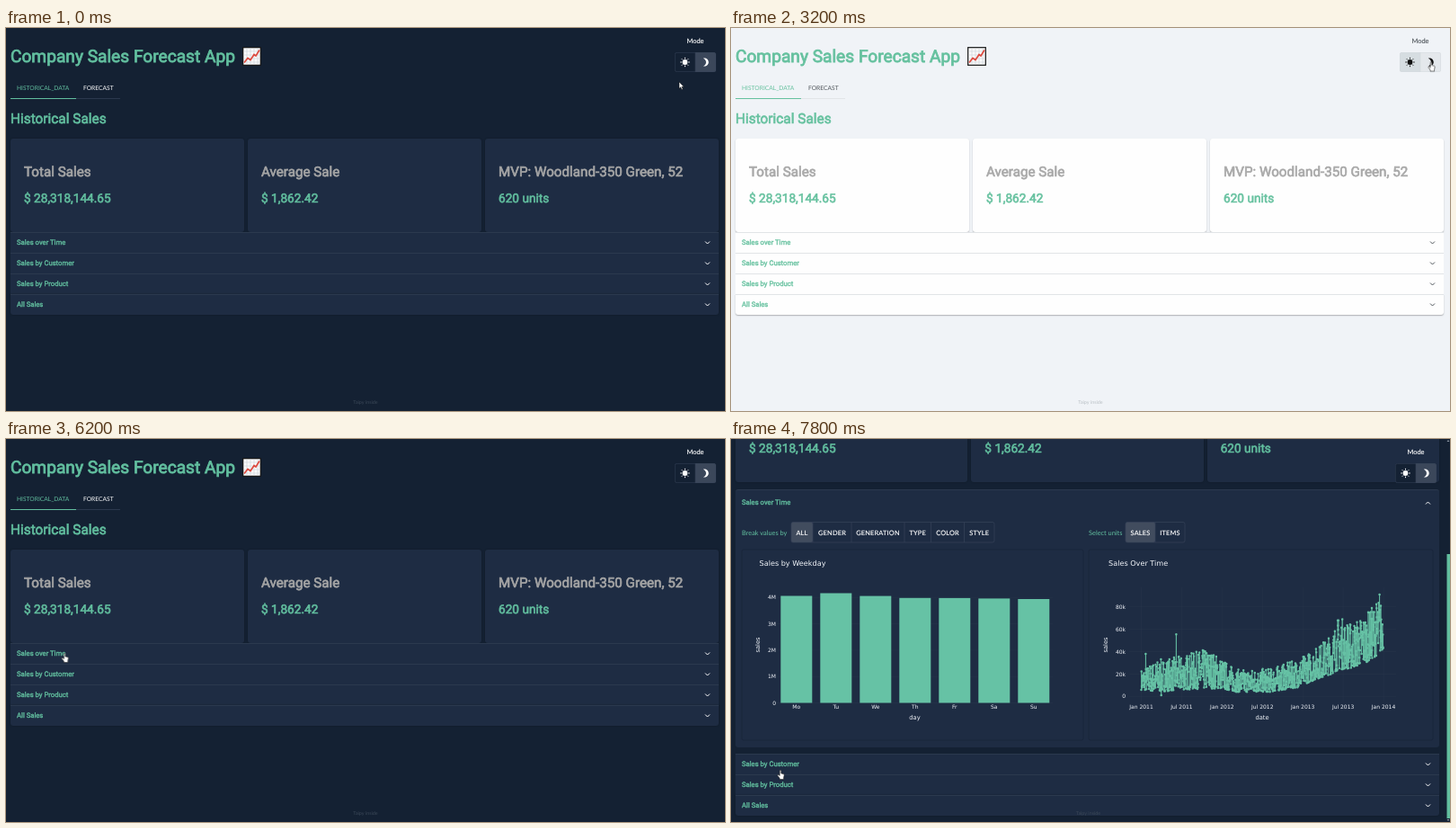
An HTML page for the animation above (8 s loop, 800 by 426 pixels).

```html
<!DOCTYPE html>
<html lang="en">
<head>
<meta charset="utf-8">
<title>Company Sales Forecast App</title>
<style>
html, body { margin: 0; width: 100%; height: 100%; overflow: hidden; }
#app, #app * { box-sizing: border-box; animation-duration: 8s; animation-timing-function: step-end; animation-iteration-count: infinite; }
#app { position: relative; width: 800px; height: 426px; overflow: hidden; background: var(--bg); animation-name: theme, mode; font-family: Lato, sans-serif; text-rendering: geometricPrecision; }
#view { position: absolute; left: 0; top: 0; width: 800px; height: 426px; animation-name: narrow; }
#page { position: absolute; left: 5px; right: 7px; top: 0; height: 606px; animation-name: scroll; }
.t { position: absolute; line-height: 20px; white-space: nowrap; }
/* regular weight thickened by a stroke */
.h { font-family: Roboto, sans-serif; font-weight: 400; color: var(--green); -webkit-text-stroke: .045em; }
#emoji { position: absolute; left: 257.5px; top: 21px; }
.tabs { position: absolute; left: 0; top: 56px; width: 122px; height: 23px; border-bottom: 1px solid var(--line); font-size: 6.7px; color: var(--text); }
.tabs i { position: absolute; left: 0; top: 21.6px; width: 73px; height: 1.2px; background: var(--green); }
.cards { position: absolute; top: 123px; left: 0; right: 0; height: 104px; display: flex; gap: 4px; }
.card { position: relative; flex: 1; border-radius: 3px; background: var(--paper); box-shadow: var(--shadow); }
.card .t { left: 15px; }
.card .k { top: 27px; font-size: 15.2px; color: var(--grey); }
.card .v { top: 57.4px; font-size: 13.65px; }
.list { position: absolute; top: 227px; left: 0; right: 0; display: flow-root; }
.row { position: relative; height: 23px; overflow: hidden; background: var(--paper); border-top: 1px solid var(--line); }
.row:last-child { border-radius: 0 0 3px 3px; box-shadow: var(--shadow); overflow: visible; }
.row .t { left: 7px; top: 1px; font-size: 7.7px; }
.row .chev { position: absolute; right: 9.5px; top: 8px; }
.chev path { fill: none; stroke: var(--text); stroke-width: 1; }
#open { animation-name: open; }
#open .t { animation-name: head; }
#open .chev { animation-name: flip; }
#charts { position: absolute; left: -5px; top: -57px; pointer-events: none; }
.mode { position: absolute; right: 10px; top: 0; width: 46px; height: 50px; color: var(--text); }
.mode .t { left: 0; width: 46px; top: 5px; text-align: center; font-size: 7.4px; -webkit-text-stroke: .15px; }
.mode svg { position: absolute; left: 0; top: 27px; }
.foot { left: 0; right: 0; top: 407px; text-align: center; font-size: 5.4px; color: var(--faint); }
#bar { position: absolute; right: 0; top: 0; opacity: 0; animation-name: show; }
#thumb { animation-name: thumb; }
#cursor { position: absolute; left: 0; top: 0; overflow: visible; animation-name: move, shape; }
#arrow { opacity: var(--arrow); }
#hand { opacity: var(--hand); }

@keyframes theme {
  0%, 57.5%, 100% { --bg: #142133; --paper: #1e2c43; --text: #fff; --green: #62bf9f; --grey: #a6a6a6; --line: #2b394e; --faint: #3b4858; --edge: #37445a; --shadow: 0 0 2px rgba(0,0,0,.35); }
  40% { --bg: #f0f3f7; --paper: #fefefe; --text: #50565c; --green: #66c19f; --grey: #a8a8a8; --line: #e1e4e7; --faint: #b9bfc5; --edge: #d3d8dd; --shadow: 0 1px 1.5px rgba(0,0,0,.28); }
}
@keyframes mode {
  0%, 100% { --sun: transparent; --moon: #3b475a; --icon: #fff; }
  5% { --sun: #222f44; --moon: #3b475a; --icon: #fff; }
  7.5% { --sun: #626c7b; --moon: transparent; --icon: #fff; }
  15% { --sun: #4a5566; --moon: transparent; --icon: #fff; }
  32.5% { --sun: #626c7b; --moon: #364357; --icon: #fff; }
  40% { --sun: #d6dde1; --moon: #e4e8ec; --icon: #111; }
  50% { --sun: transparent; --moon: #d0d6db; --icon: #111; }
  57.5% { --sun: transparent; --moon: #4c5768; --icon: #fff; }
  60% { --sun: transparent; --moon: #3b475a; --icon: #fff; }
}
@keyframes narrow { 0%, 100% { width: 800px; } 85% { width: 795px; } }
@keyframes show { 0%, 100% { opacity: 0; } 85% { opacity: 1; } }
@keyframes open { 0%, 100% { height: 23px; margin: 0; border-radius: 0; } 85% { height: 287px; margin: 8px 0 7px; border-radius: 3px; } }
@keyframes head { 0%, 100% { top: 1px; } 85% { top: 4px; } }
@keyframes flip { 0%, 100% { transform: none; } 85% { transform: translateY(3px) rotate(180deg); } }
@keyframes scroll {
  0%, 85%, 100% { transform: none; }
  87.5% { transform: translateY(-45px); }
  90% { transform: translateY(-92px); }
  92.5% { transform: translateY(-134px); }
  95% { transform: translateY(-166px); }
  97.5% { transform: translateY(-179px); }
}
@keyframes thumb {
  0%, 85%, 100% { transform: translateY(4px); }
  87.5% { transform: translateY(35px); }
  90% { transform: translateY(68px); }
  92.5% { transform: translateY(97px); }
  95% { transform: translateY(119px); }
  97.5% { transform: translateY(128px); }
}
@keyframes shape {
  0%, 15%, 60%, 100% { --arrow: 1; --hand: 0; }
  5%, 32.5%, 77.5% { --arrow: 0; --hand: 1; }
}
@keyframes move {
  0%, 100% { transform: translate(749px, 60px); }
  2.5% { transform: translate(751px, 52px); }
  5% { transform: translate(755px, 41px); }
  7.5% { transform: translate(756px, 38px); }
  15% { transform: translate(690px, 60px); }
  17.5% { transform: translate(450px, 120px); }
  20% { transform: translate(236px, 145px); }
  22.5% { transform: translate(371px, 154px); }
  30% { transform: translate(610px, 105px); }
  32.5%, 40%, 50% { transform: translate(779px, 37.5px); }
  57.5% { transform: translate(697px, 53px); }
  60% { transform: translate(620px, 56px); }
  62.5% { transform: translate(530px, 52px); }
  65% { transform: translate(460px, 48px); }
  67.5% { transform: translate(405px, 43px); }
  70% { transform: translate(367px, 36px); }
  72.5% { transform: translate(270px, 95px); }
  75% { transform: translate(140px, 185px); }
  77.5%, 85% { transform: translate(65.3px, 238px); }
  87.5% { transform: translate(65px, 242px); }
  90% { transform: translate(64px, 262px); }
  92.5% { transform: translate(62px, 300px); }
  95% { transform: translate(58px, 345px); }
  97.5% { transform: translate(55px, 368px); }
}
</style>
</head>
<body>
<div id="app">
  <div id="view">
    <div id="page">
      <div class="t h" style="left:0;top:22px;font-size:19.15px">Company Sales Forecast App</div>
      <svg id="emoji" width="21" height="21">
        <rect x=".7" y=".7" width="19.6" height="19.6" fill="#fafafa" stroke="#111" stroke-width="1.2"/>
        <path d="M5 1.5v18M9 1.5v18M13 1.5v18M17 1.5v18M1.5 5h18M1.5 9h18M1.5 13h18M1.5 17h18" stroke="#c9d2d8" stroke-width=".6"/>
        <path d="M2 17.5L6 12.5L9 14.5L13 8.5L15 10L19 3.5" fill="none" stroke="#dd4b40" stroke-width="1.7"/>
      </svg>
      <div class="tabs">
        <div class="t" style="left:7px;top:1px;color:var(--green)">HISTORICAL_DATA</div>
        <div class="t" style="left:81px;top:1px">FORECAST</div>
        <i></i>
      </div>
      <div class="t h" style="left:0;top:91px;font-size:15.4px">Historical Sales</div>
      <div class="cards">
        <div class="card"><div class="t h k">Total Sales</div><div class="t h v">$ 28,318,144.65</div></div>
        <div class="card"><div class="t h k">Average Sale</div><div class="t h v">$ 1,862.42</div></div>
        <div class="card"><div class="t h k">MVP: Woodland-350 Green, 52</div><div class="t h v">620 units</div></div>
      </div>
      <div class="list" id="list"></div>
    </div>
    <div class="mode">
      <div class="t">Mode</div>
      <svg width="46" height="22">
        <rect width="46" height="22" rx="2.5" fill="var(--bg)"/>
        <path d="M23 0H2.5A2.5 2.5 0 0 0 0 2.5v17A2.5 2.5 0 0 0 2.5 22H23z" fill="var(--sun)"/>
        <path d="M23 0h20.5A2.5 2.5 0 0 1 46 2.5v17a2.5 2.5 0 0 1-2.5 2.5H23z" fill="var(--moon)"/>
        <rect x=".3" y=".3" width="45.4" height="21.4" rx="2.3" fill="none" stroke="var(--edge)" stroke-width=".6"/>
        <path d="M23 0v22" stroke="var(--edge)" stroke-width=".6"/>
        <g transform="translate(11.5 11)">
          <circle r="2.9" fill="var(--icon)"/>
          <path id="rays" stroke="var(--icon)" stroke-width="1"/>
        </g>
        <path transform="translate(29 5.5) scale(.46)" fill="var(--icon)" d="M9 2c-1.05 0-2.05.16-3 .46 4.06 1.27 7 5.06 7 9.54s-2.94 8.27-7 9.54c.95.3 1.95.46 3 .46 5.52 0 10-4.48 10-10S14.52 2 9 2z"/>
      </svg>
    </div>
    <div class="t foot">Taipy inside</div>
  </div>
  <svg id="bar" width="5" height="426">
    <rect width="5" height="426" fill="#142133"/>
    <path d="M1.5 3L3 1L4.5 3zM1.5 423L3 425L4.5 423z" fill="#8a94a0"/>
    <rect id="thumb" x="1.5" width="3.5" height="294" fill="#62bf9f"/>
  </svg>
  <svg id="cursor" width="10" height="14">
    <path id="arrow" d="M0 0V7.3L1.7 5.8L2.9 8.5L4.1 8L2.9 5.3H5.2z" fill="#fff" stroke="#111" stroke-width=".5"/>
    <path id="hand" d="M-.8 .8Q0-.4 .8 .8V4L3.3 4.6Q4.3 4.9 4.2 6L3.6 8.6V10.6H-.9V9.2L-3.1 6.4Q-3.3 5.2-2.1 5.4L-.8 6.5z" fill="#fff" stroke="#222" stroke-width=".6"/>
  </svg>
</div>
<script>
const $ = id => document.getElementById(id);
const chev = '<svg class="chev" width="7" height="6"><path d="M1 1.5L3.5 4L6 1.5"/></svg>';
$('list').innerHTML = ['Sales over Time', 'Sales by Customer', 'Sales by Product', 'All Sales']
  .map((name, i) => `<div class="row"${i ? '' : ' id="open"'}><div class="t h">${name}</div>${chev}</div>`).join('');

$('rays').setAttribute('d', Array.from({ length: 8 }, (_, i) => {
  const c = Math.cos(i * Math.PI / 4), s = Math.sin(i * Math.PI / 4);
  return `M${c * 3.7} ${s * 3.7}L${c * 5.2} ${s * 5.2}`;
}).join(''));

const GREEN = '#66c2a5';
const parts = [];
const add = s => parts.push(s);
const text = (x, y, s, size, { anchor = 'middle', font = 'DejaVu Sans', fill = '#f2f5fa', extra = '' } = {}) =>
  add(`<text x="${x}" y="${y + size * .36}" font-size="${size}" font-family="${font}, sans-serif" text-anchor="${anchor}" fill="${fill}" ${extra}>${s}</text>`);
const line = d => add(`<path d="${d}" stroke="#fff" stroke-opacity=".045" stroke-width=".6"/>`);
const frame = (x, w) => add(`<rect x="${x}" y="123" width="${w}" height="212" rx="2" fill="none" stroke="#19263a" stroke-width=".9"/>`);

function buttons(edges, names) {
  const x0 = edges[0], w = edges[edges.length - 1] - x0;
  add(`<rect x="${x0}" y="92.5" width="${edges[1] - x0}" height="22.5" rx="2" fill="#414c5e"/>`);
  add(`<rect x="${x0}" y="92.5" width="${w}" height="22.5" rx="2" fill="none" stroke="#37445a" stroke-width=".7"/>`);
  names.forEach((n, i) => {
    if (i) add(`<path d="M${edges[i]} 92.5v22.5" stroke="#37445a" stroke-width=".7"/>`);
    text((edges[i] + edges[i + 1]) / 2, 104, n, 7.36, { font: 'Lato', fill: '#fff', extra: 'letter-spacing=".2" stroke="#fff" stroke-width=".15"' });
  });
}

const label = { anchor: 'start', font: 'Lato', fill: '#62bf9f' };
text(12, 104, 'Break values by', 7.4, label);
text(398, 104, 'Select units', 7.4, label);
buttons([67, 91, 134, 193, 222.5, 259.5, 293], ['ALL', 'GENDER', 'GENERATION', 'TYPE', 'COLOR', 'STYLE']);
buttons([439, 472, 505], ['SALES', 'ITEMS']);
frame(12, 380);
frame(398, 383);

const start = { anchor: 'start' }, end = { anchor: 'end' };
const upright = (x, y) => text(x, y, 'sales', 6.7, { extra: `transform="rotate(-90 ${x} ${y})"` });

// weekday bars
text(31.5, 138, 'Sales by Weekday', 8.15, start);
['0', '1M', '2M', '3M', '4M'].forEach((s, i) => {
  const y = 293.5 - i * 29.3;
  line(`M51 ${y}H358`);
  text(50, y, s, 6, end);
});
const tops = [174.5, 171.5, 174.6, 176.8, 176.9, 177.4, 178];
['Mo', 'Tu', 'We', 'Th', 'Fr', 'Sa', 'Su'].forEach((s, i) => {
  const x = 55.3 + i * 44;
  add(`<rect x="${x}" y="${tops[i]}" width="35" height="${293.5 - tops[i]}" fill="${GREEN}"/>`);
  text(x + 17.5, 298, s, 6);
});
text(204.5, 310, 'day', 6.7);
upright(30, 229);

// daily sales
text(420, 138, 'Sales Over Time', 8.15, start);
const yOf = k => 286.3 - k * 1.244;
['0', '20k', '40k', '60k', '80k'].forEach((s, i) => {
  line(`M443 ${yOf(i * 20)}H740`);
  text(439, yOf(i * 20), s, 6, end);
});
['Jan 2011', 'Jul 2011', 'Jan 2012', 'Jul 2012', 'Jan 2013', 'Jul 2013', 'Jan 2014'].forEach((s, i) => {
  const x = 456.5 + i * 44.92;
  line(`M${x} 165V292`);
  text(x, 298, s, 6);
});
text(591, 310, 'date', 6.7);
upright(417, 229);

// x, low and high of the band the values fall in
const band = [[456, 6, 24], [475, 4, 33], [500, 6, 36], [530, 7, 43], [546, 7, 34], [562, 4, 24], [600, 4, 25],
  [630, 8, 33], [650, 15, 43], [668, 20, 56], [676, 24, 72], [690, 25, 66], [708, 31, 75], [721, 38, 88], [727, 44, 78]];
let seed = 7;
const rnd = () => (seed = (seed * 16807) % 2147483647) / 2147483647;
const spikes = { 20: 38, 90: 1, 158: 55.5, 1077: 91 };
const pts = [];
for (let i = 0; i < 1095; i++) {
  const x = 456.5 + i * 269.5 / 1095;
  const j = band.findIndex(b => b[0] > x), a = band[j - 1], b = band[j];
  const f = (x - a[0]) / (b[0] - a[0]);
  const lo = a[1] + (b[1] - a[1]) * f, hi = a[2] + (b[2] - a[2]) * f;
  const v = spikes[i] ?? lo + (hi - lo) * rnd() ** 1.4;
  pts.push(x.toFixed(1) + ' ' + yOf(v).toFixed(1));
}
add(`<path d="M${pts.join('L')}" fill="none" stroke="${GREEN}" stroke-width=".8" stroke-linejoin="round"/>`);
add(`<path d="${pts.map(p => `M${p}h0`).join('')}" stroke="${GREEN}" stroke-width="2.5" stroke-linecap="round"/>`);

$('open').insertAdjacentHTML('beforeend', `<svg id="charts" width="800" height="343">${parts.join('')}</svg>`);
</script>
</body>
</html>
```
